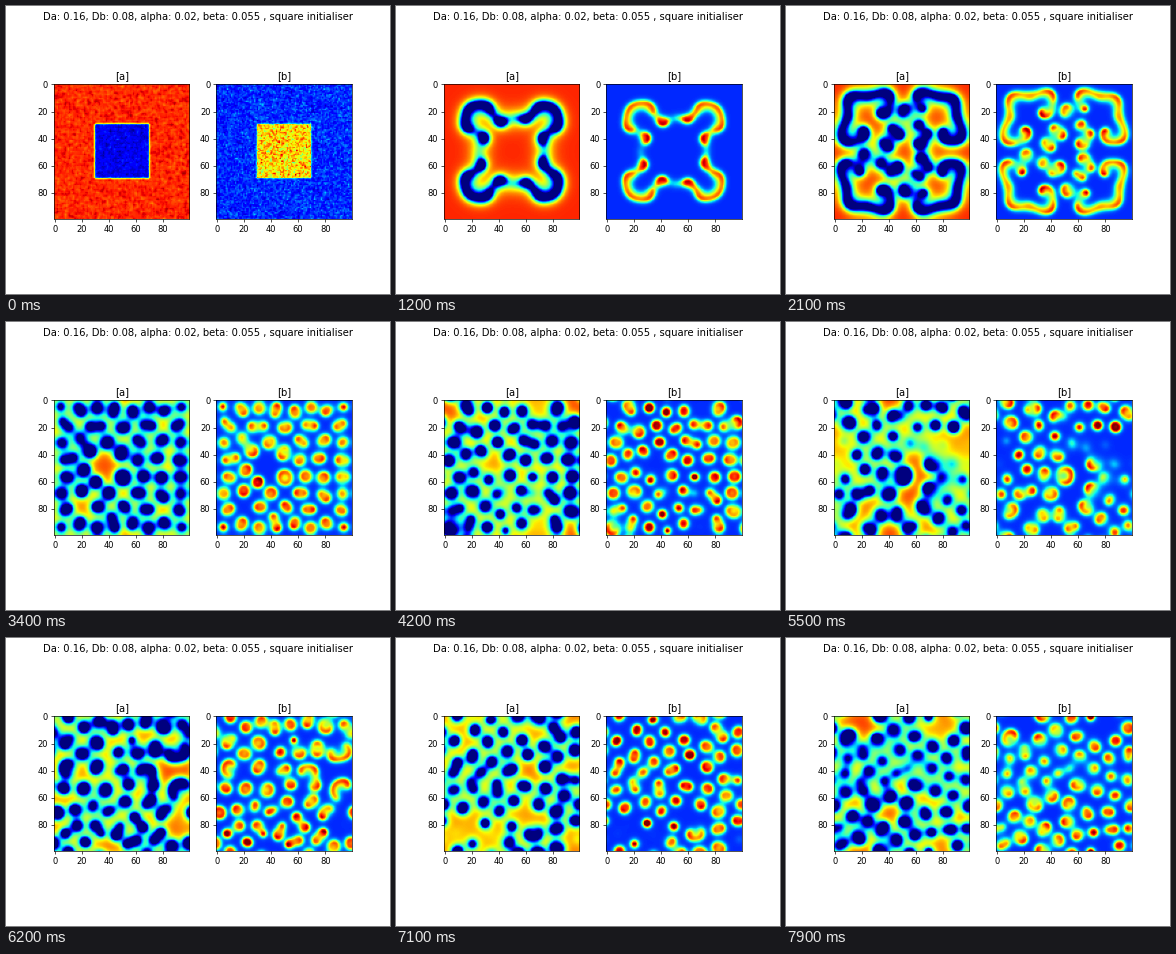
A matplotlib script for the animation above (8 s loop, 384 by 288 pixels).

```python
import matplotlib.pyplot as plt
import numpy as np
from matplotlib.animation import FuncAnimation

DA, DB, ALPHA, BETA = 0.16, 0.08, 0.02, 0.055
N, FRAMES, INTERVAL = 100, 80, 100
STEPS = 50  # Euler steps between two frames
LIMITS = ((0.425, 1.087), (-0.078, 0.395))


def square_initialiser(rng, half=20):
    a = rng.normal(1, 0.04, (N, N))
    b = rng.normal(0, 0.036, (N, N))
    core = slice(N // 2 - half, N // 2 + half)
    size = (2 * half, 2 * half)
    a[core, core] = rng.normal(0.51, 0.04, size)
    b[core, core] = rng.normal(0.235, 0.05, size)
    return a, b


def laplacian(z):
    return (np.roll(z, 1, 0) + np.roll(z, -1, 0)
            + np.roll(z, 1, 1) + np.roll(z, -1, 1) - 4 * z)


def step(a, b):
    r = a * b * b
    return (a + DA * laplacian(a) - r + ALPHA * (1 - a),
            b + DB * laplacian(b) + r - (ALPHA + BETA) * b)


def evolve():
    state = step(*square_initialiser(np.random.default_rng(7)))
    states = [state]
    for _ in range(FRAMES - 1):
        for _ in range(STEPS):
            state = step(*state)
        states.append(state)
    return states


states = evolve()

fig, axes = plt.subplots(1, 2, figsize=(6.4, 4.8), dpi=60)
fig.suptitle(f"Da: {DA}, Db: {DB}, alpha: {ALPHA}, beta: {BETA} , "
             "square initialiser")
images = []
for ax, name, field, (low, high) in zip(axes, "ab", states[0], LIMITS):
    images.append(ax.imshow(field, cmap="jet", vmin=low, vmax=high))
    ax.set_title(f"[{name}]")


def update(i):
    for image, field in zip(images, states[i]):
        image.set_data(field)
    return images


anim = FuncAnimation(fig, update, frames=FRAMES, interval=INTERVAL,
                     repeat=True, repeat_delay=0)
plt.show()
```
